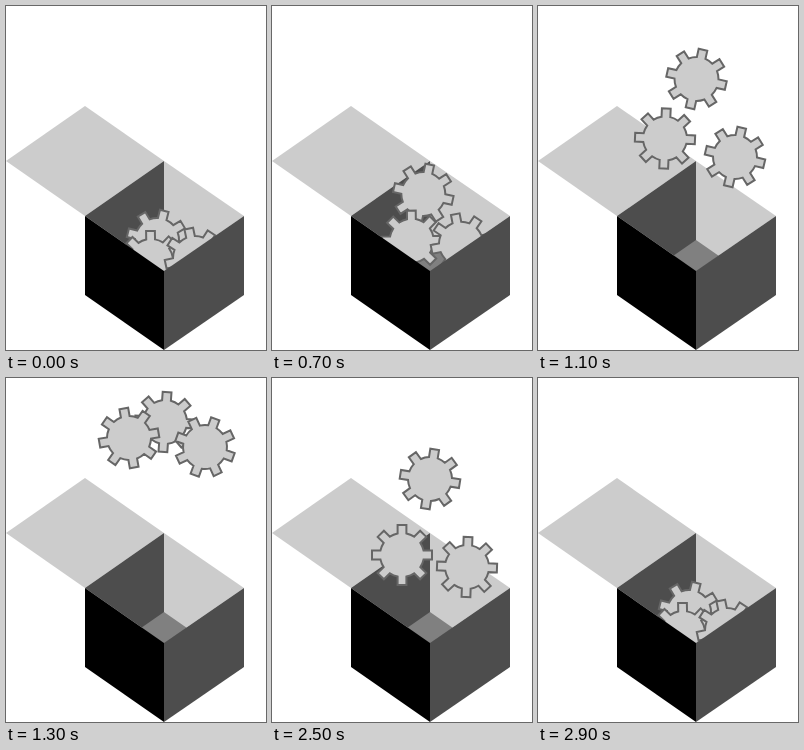
Write an HTML page that moves like this. It is 260 px wide and 344 px high and loops after 3 s.

```html
<!DOCTYPE html>
<html>
<head>
<meta charset="utf-8">
<style>
html, body { margin: 0; width: 100%; height: 100%; overflow: hidden; background: #fff; }
svg { display: block; }
.gear { fill: #ccc; stroke: #666; stroke-width: 2; }
</style>
</head>
<body>
<svg width="260" height="344" viewBox="0 0 260 344">
  <path fill="#ccc" d="M79 100L158 155L79 210L0 155Z"/>
  <path fill="#4d4d4d" d="M79 210L158 155V265Z"/>
  <path fill="#ccc" d="M158 155L238 210L158 265Z"/>
  <path fill="gray" d="M158 234L181 250L158 266L135 250Z"/>
  <g id="gears"></g>
  <path d="M79 210L158 265V344L79 289Z"/>
  <path fill="#4d4d4d" d="M158 265L238 210V289L158 344Z"/>
</svg>
<script>
const TEETH = 8, ROOT = 22, TIP = 30, HALF = 4.4;

function gearPath() {
  const base = Math.sqrt(ROOT * ROOT - HALF * HALF);
  let d = '';
  for (let i = 0; i < TEETH; i++) {
    const a = i * 2 * Math.PI / TEETH, c = Math.cos(a), s = Math.sin(a);
    const at = (r, w) => (r * c - w * s).toFixed(2) + ' ' + (r * s + w * c).toFixed(2);
    d += (i ? `A${ROOT} ${ROOT} 0 0 1 ` : 'M') + at(base, -HALF) +
      'L' + at(TIP, -HALF) + 'L' + at(TIP, HALF) + 'L' + at(base, HALF);
  }
  return d + `A${ROOT} ${ROOT} 0 0 1 ${base.toFixed(2)} ${-HALF}Z`;
}

// Poses [x, y, degrees] of the back, left and right gear at each level
const LEVELS = [0, 1, 4, 5, 7, 8];
const POSES = [
  [[151, 234, 14], [151, 217, 14], [152, 130, 9], [158, 101, 9], [159, 45, 16], [159, 44, 4]],
  [[145, 255, -1], [145, 255, -1], [129, 194, 0], [130, 177, 0], [124, 88, 5], [123, 60, 35]],
  [[189, 252, 33], [189, 252, 33], [189, 209, 36], [195, 189, 47], [199, 113, 69], [199, 69, 65]]
];

// Level reached in each 100 ms step
function levelAt(step) {
  if (step < 5) return 0;
  if (step < 7) return 1;
  if (step < 13) return step - 5;
  if (step < 23) return 8;
  if (step < 27) return 30 - step;
  return [2.5, 1, 0][step - 27];
}

const gears = POSES.map(() => {
  const p = document.createElementNS('http://www.w3.org/2000/svg', 'path');
  p.setAttribute('class', 'gear');
  p.setAttribute('d', gearPath());
  return document.getElementById('gears').appendChild(p);
});

function draw(ms) {
  const level = levelAt(Math.floor(ms % 3000 / 100));
  let k = 0;
  while (k < LEVELS.length - 2 && level >= LEVELS[k + 1]) k++;
  const f = (level - LEVELS[k]) / (LEVELS[k + 1] - LEVELS[k]);
  gears.forEach((gear, i) => {
    const [x, y, r] = POSES[i][k].map((v, j) => v + (POSES[i][k + 1][j] - v) * f);
    gear.setAttribute('transform', `translate(${x} ${y}) rotate(${r})`);
  });
}

const start = performance.now();
function tick() {
  draw(performance.now() - start);
  requestAnimationFrame(tick);
}
tick();
</script>
</body>
</html>
```
